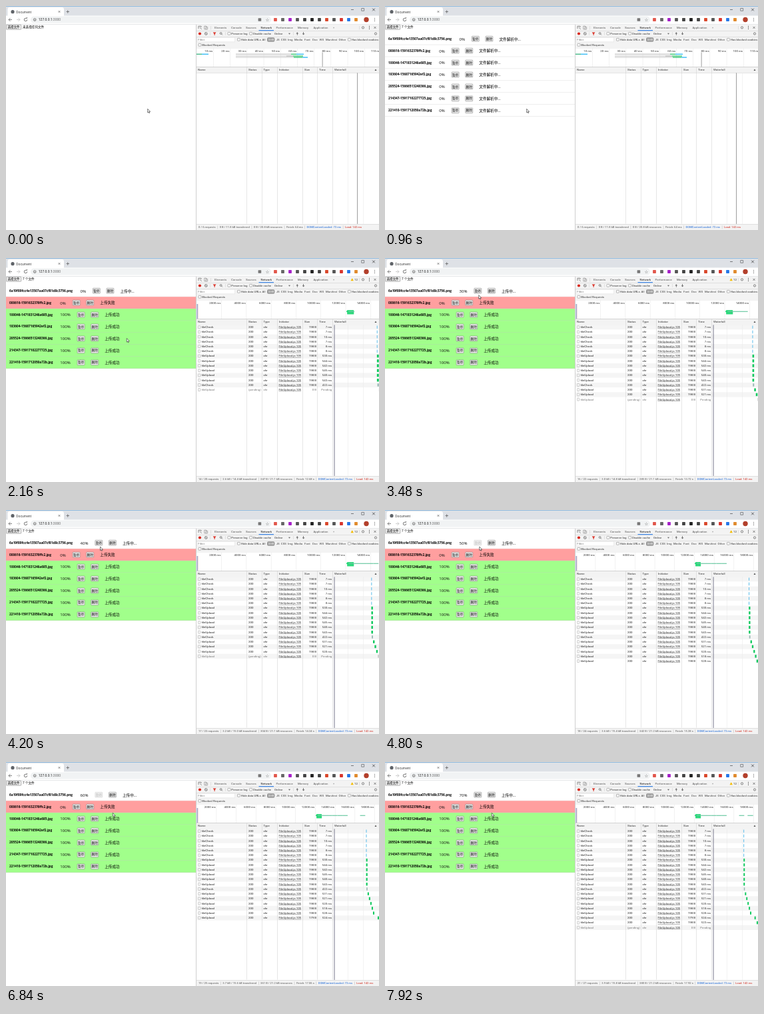
Animation of 560 by 336 pixels, one loop 8 s. Source, as an HTML page with a canvas:

```html
<!DOCTYPE html>
<html lang="zh">
<head>
<meta charset="utf-8">
<title>Document</title>
<style>
  html, body { margin: 0; width: 100%; height: 100%; overflow: hidden; background: #fff; }
  canvas { display: block; width: 560px; height: 336px; }
</style>
</head>
<body>
<canvas id="stage"></canvas>
<script>
const W = 560, H = 336, LOOP = 8000, STEP = 120;
const PANEL = 286, FALL = 493, ROW = 7.23, BODY = 100.1;
const UI = 'Roboto, "Noto Sans CJK SC", sans-serif';
const PAGE = '"Open Sans", "Noto Sans CJK SC", sans-serif';

const canvas = document.getElementById('stage');
const ratio = window.devicePixelRatio || 1;
canvas.width = W * ratio;
canvas.height = H * ratio;
const c = canvas.getContext('2d');

// Requests: start in seconds, duration in milliseconds
const request = (name, start, ms, size = 198) => ({ name, start, ms, size, end: start + ms / 1000 });
const chunks = [
  [12.685, 531], [13.2, 521], [13.72, 520], [14.24, 518],
  [14.755, 528], [16.536, 524, 179], [17.397, 523], [17.93, 520]
].map(args => request('fileUpload', ...args));
const requests = [
  ...[7, 7, 10, 7, 8, 8].map(ms => request('fileCheck', 12.1, ms)),
  ...[530, 544, 542, 545, 540, 543].map(ms => request('fileUpload', 12.125, ms)),
  request('fileCheck', 12.258, 422),
  ...chunks
];

const files = [
  '6a19f89fcc4e13507aa07cf81d8c3756.png', '000616-1591632376ffc2.jpg',
  '100046-1471831246a685.jpg', '183604-15687165942ef2.jpg',
  '205524-15666513248366.jpg', '214347-15917102277725.jpg', '221410-1591712050a72b.jpg'
];

// [animation ms, network seconds] and [animation ms, x, y]
const clockKeys = [[1560, 12.12], [2160, 12.72], [3480, 13.87], [4800, 15.3], [6840, 17.1], [8000, 18.02]];
const pointerKeys = [[0, 212.7, 154.3], [1560, 212.7, 154.3], [2160, 181.3, 120.5], [3000, 140.3, 56],
  [4320, 141.6, 55], [4800, 141.8, 55], [5400, 160.3, 76.4], [8000, 160.3, 76.4]];

function along(keys, t) {
  let i = 1;
  while (i < keys.length - 1 && keys[i][0] < t) i++;
  const a = keys[i - 1], b = keys[i];
  const k = Math.min(1, Math.max(0, (t - a[0]) / (b[0] - a[0])));
  return a.slice(1).map((v, j) => v + (b[j + 1] - v) * k);
}

function rect(x, y, w, h, color) {
  c.fillStyle = color;
  c.fillRect(x, y, w, h);
}

function frame(x, y, w, h, color, fill, radius = 0) {
  c.beginPath();
  c.roundRect(x, y, w, h, radius);
  if (fill) { c.fillStyle = fill; c.fill(); }
  if (color) { c.strokeStyle = color; c.lineWidth = 0.5; c.stroke(); }
}

function dot(x, y, r, color) {
  c.beginPath();
  c.arc(x, y, r, 0, 7);
  c.fillStyle = color;
  c.fill();
}

function path(points, color, width = 0.7, fill) {
  c.beginPath();
  points.forEach(([x, y], i) => i ? c.lineTo(x, y) : c.moveTo(x, y));
  if (fill) { c.closePath(); c.fillStyle = fill; c.fill(); }
  if (color) { c.strokeStyle = color; c.lineWidth = width; c.stroke(); }
}

function ring(x, y, r, color, from = 0, to = 7) {
  c.beginPath();
  c.arc(x, y, r, from, to);
  c.strokeStyle = color;
  c.lineWidth = 0.8;
  c.stroke();
}

function cross(x, y, r, color) {
  path([[x - r, y - r], [x + r, y + r]], color);
  path([[x - r, y + r], [x + r, y - r]], color);
}

// Draws text on its baseline and returns its width
function text(s, x, y, { size = 4.4, color = '#333', font = UI, weight = 400, align = 'left' } = {}) {
  c.font = `${weight} ${size}px ${font}`;
  c.textAlign = align;
  c.fillStyle = color;
  c.fillText(s, x, y);
  return c.measureText(s).width;
}

function check(x, y, label) {
  frame(x, y - 3.8, 3.8, 3.8, '#777', '#fff', 0.5);
  text(label, x + 5.2, y);
}

function menuDots(x, y) {
  for (const dy of [-2, 0, 2]) dot(x, y + dy, 0.55, '#555');
}

function drawBrowser() {
  rect(0, 0, W, 15, '#dee1e6');
  rect(0, 0, W, 0.8, '#7fb2de');
  frame(2.5, 2, 84.5, 15, null, '#fff', 3);
  dot(10, 8.7, 2.6, '#5f6368');
  text('Document', 15.3, 11, { size: 5, color: '#444' });
  cross(80, 8.5, 1.3, '#555');
  path([[90.5, 8.5], [95, 8.5]], '#555');
  path([[92.7, 6.3], [92.7, 10.8]], '#555');
  path([[518, 5.5], [522, 5.5]], '#333', 0.6);
  frame(533.8, 3.5, 3.8, 3.8, '#333');
  cross(552, 5.5, 1.9, '#333');

  rect(0, 14.5, W, 13, '#fff');
  path([[6.5, 18], [4, 20.5], [6.5, 23]], '#555');
  path([[4, 20.5], [9, 20.5]], '#555');
  path([[18.5, 18], [21, 20.5], [18.5, 23]], '#bbb');
  path([[16, 20.5], [21, 20.5]], '#bbb');
  ring(29.5, 20.5, 2.2, '#555', 0, 5.2);
  path([[29.8, 18.5], [31.8, 18.8], [31.8, 16.8]], null, 0, '#555');
  frame(37, 15.6, 361, 10, null, '#f1f3f4', 5);
  ring(43.2, 20.5, 1.9, '#666');
  rect(42.8, 20, 0.8, 1.6, '#666');
  const w = text('127.0.0.1', 48.8, 22.3, { size: 5, color: '#222' });
  text(':3000', 48.8 + w, 22.3, { size: 5, color: '#666' });

  frame(378.6, 18.2, 4.6, 4.6, null, '#777', 0.5);
  text('☆', 392.5, 22.7, { size: 6.5, color: '#555', align: 'center', font: '"DejaVu Sans", sans-serif' });
  ['#e2574c', '#666', '#a520c8', '#555', '#444', '#222', '#444', '#d9472b', '#555', '#d8342c', '#2677e8', '#e08a2c']
    .forEach((color, i) => frame(402.1 + i * 11, 18.1, 4.8, 4.8, null, color, 0.6));
  dot(541, 20.5, 3.7, '#b3402c');
  menuDots(553.5, 20.5);
  rect(0, 27.2, W, 0.6, '#d5d7da');
}

function pageButton(x, y, label, disabled) {
  frame(x, y, 11, 7.8, disabled ? '#ccc' : '#777', '#efefef', 0.8);
  text(label, x + 5.5, y + 5.5, { size: 4.6, color: disabled ? '#bbb' : '#000', align: 'center', font: PAGE });
}

function drawPage(t, now) {
  const chosen = t >= 960;
  frame(0.4, 28.2, 22.4, 7, '#767676', '#efefef', 0.8);
  text('选择文件', 11.4, 33.3, { size: 4.5, color: '#000', font: PAGE, align: 'center' });
  text(chosen ? '7 个文件' : '未选择任何文件', 25, 33.3, { size: 4.6, color: '#000', font: PAGE });
  if (!chosen) return;

  const uploaded = now >= 12.67;
  const progress = 10 * chunks.filter(k => k.start + 0.08 < now).length;
  files.forEach((name, i) => {
    const top = 40.3 + i * 17.93, base = top + 10.8;
    const finished = i > 0 && uploaded, failed = finished && i === 1;
    if (finished) rect(0, top, 285, 18, failed ? '#ff9f9f' : '#a1ff8b');
    rect(0, top + 17.5, 285, 0.5, finished ? 'rgba(190,190,190,.6)' : '#ddd');

    const percent = i === 0 ? progress : finished && !failed ? 100 : 0;
    let status = '文件解析中...';
    if (finished) status = failed ? '上传失败' : '上传成功';
    else if (now >= (i ? 12.1 : 12.258)) status = '上传中...';

    text(name, 5, base - 0.4, { size: 4.8, color: '#000', font: PAGE, weight: 700 });
    const x = i ? 81.3 : 111.5;
    const left = x + 10.3 + text(percent + '%', x, base + 0.5, { size: 6.1, color: '#111', font: PAGE });
    const paused = i === 0 && t >= 4320 && t < 7260;
    pageButton(left, top + 5, '暂停', paused);
    pageButton(left + 20.6, top + 5, '删除');
    text(status, left + 41.2, base + 0.4, { size: 5.6, color: '#000', font: PAGE });
  });
}

function drawToolbars(active) {
  rect(285, 27.8, 0.8, H, '#c4c4c4');
  rect(PANEL, 27.8, W - PANEL, 35.5, '#f3f3f3');
  for (const y of [37, 46, 63]) rect(PANEL, y, W - PANEL, 0.5, '#ccc');

  path([[289, 34], [289, 30.3], [293, 30.3], [293, 32]], '#666');
  path([[290.8, 32], [293.8, 34.8]], '#666');
  frame(297.8, 30.2, 3, 4.6, '#666');
  frame(300.2, 31.5, 2.4, 3.4, '#666', '#f3f3f3');
  rect(307, 30, 0.5, 5.5, '#ccc');
  [['Elements', 313], ['Console', 338], ['Sources', 360], ['Network', 382.5],
   ['Performance', 405.5], ['Memory', 438], ['Application', 461.5], ['»', 491]]
    .forEach(([label, x]) => text(label, x, 34, { color: label === 'Network' ? '#111' : '#555' }));
  rect(379.5, 36.2, 22.5, 1, '#1a73e8');
  if (active) {
    path([[517.5, 34.2], [519.7, 30.2], [521.9, 34.2]], null, 0, '#f4bd00');
    text('12', 523, 34);
  }
  rect(530, 30, 0.5, 5.5, '#ccc');
  ring(536, 32.4, 1.6, '#666');
  menuDots(545.5, 32.4);
  cross(554, 32.4, 1.5, '#555');

  dot(291, 41.5, 2.1, '#d9281c');
  ring(300.3, 41.5, 1.9, '#666');
  path([[299, 40.2], [301.6, 42.8]], '#666');
  rect(306.5, 39, 0.5, 5, '#ccc');
  path([[310.7, 39.6], [315.5, 39.6], [313.6, 42], [313.6, 44], [312.6, 44], [312.6, 42]], null, 0, '#d9281c');
  ring(322.6, 41, 1.4, '#666');
  path([[323.6, 42], [325, 43.5]], '#666');
  rect(329.5, 39, 0.5, 5, '#ccc');
  check(333, 43.2, 'Preserve log');
  check(365.7, 43.2, 'Disable cache');
  text('Online', 403, 43.2);
  path([[424, 40.7], [427, 40.7], [425.5, 42.8]], null, 0, '#666');
  rect(431.5, 39, 0.5, 5, '#ccc');
  path([[435.5, 41.5], [437.3, 39.3], [439.1, 41.5]], null, 0, '#666');
  path([[444.8, 41.3], [446.6, 43.5], [448.4, 41.3]], null, 0, '#666');
  rect(436.9, 41, 0.8, 2.8, '#666');
  rect(446.2, 39, 0.8, 2.8, '#666');
  ring(555, 41.5, 1.6, '#666');

  frame(287, 47.2, 56.5, 6.6, '#ddd', '#fff');
  text('Filter', 288.3, 52.2, { color: '#777' });
  check(347.5, 52.2, 'Hide data URLs');
  frame(392, 47.2, 11.4, 6.6, null, '#9a9a9a', 2);
  [['All', 384.5], ['XHR', 393.7], ['JS', 405.7], ['CSS', 412.8], ['Img', 423], ['Media', 433],
   ['Font', 448], ['Doc', 460], ['WS', 470.5], ['Manifest', 480], ['Other', 499.5]]
    .forEach(([label, x]) => text(label, x, 52.2, { color: label === 'XHR' ? '#fff' : '#444' }));
  check(513.5, 52.2, 'Has blocked cookies');
  check(289, 60.2, 'Blocked Requests');
}

function drawOverview(started, now) {
  rect(PANEL, 63.5, W - PANEL, 28, '#fff');
  const gap = now > 14.7 ? 29.7 : now ? 37.3 : 25.2;
  const unit = now ? 2000 : 10;
  for (let i = 1; i < 12; i++) {
    const x = PANEL + i * gap;
    rect(x, 63.5, 0.5, 28, '#e4e4e4');
    text(`${i * unit} ms`, x - 0.9, 69.1, { align: 'right' });
  }
  if (!now) {
    [[286, 294, 71.6, '#36b37e'], [294, 304, 71.6, '#29b6f6'],
     [345, 428, 71.6, '#c8c8c8'], [428, 436, 71.6, '#2fc46b'], [436, 447, 71.6, '#29b6f6'],
     [345, 421, 74.4, '#d0d0d0'], [421, 431, 74.4, '#aaa'], [431, 446, 74.4, '#2fc46b'],
     [345, 432, 76.4, '#d8d8d8'], [432, 445, 76.4, '#2fc46b'], [445, 453, 76.4, '#29b6f6']]
      .forEach(([a, b, y, color]) => rect(a, y, b - a, 1.3, color));
    rect(474.7, 69.5, 0.8, 22, '#888');
    return;
  }
  const at = s => PANEL + s * gap / 2;
  started.forEach((r, i) => {
    const y = i >= 6 && i < 12 ? 78.2 + (i - 6) : 79.7;
    rect(at(r.start), y, Math.max(0.6, at(Math.min(r.end, now)) - at(r.start)), 1.2, i < 12 ? '#12d46a' : '#6cc9a4');
  });
  rect(286.7, 69, 0.9, 22.3, '#4a6fb0');
  rect(287.8, 69, 0.5, 22.3, '#e0a0a0');
}

function drawTable(started, now) {
  rect(PANEL, 91.2, W - PANEL, 9, '#f3f3f3');
  rect(PANEL, 91.2, W - PANEL, 0.6, '#bbb');
  rect(PANEL, 100, W - PANEL, 0.5, '#ccc');
  started.forEach((r, i) => { if (i % 2 === 0) rect(PANEL, BODY + i * ROW, W - PANEL, ROW, '#f5f5f5'); });
  [['Name', 288], ['Status', 364], ['Type', 386.5], ['Initiator', 410], ['Size', 448], ['Time', 470], ['Waterfall', 493]]
    .forEach(([label, x]) => text(label, x, 97.2));
  for (const x of [361, 384, 407, 445, 467, 490]) rect(x, 91.5, 0.5, 235, '#ccc');
  for (const x of [513, 536]) rect(x, 100.4, 0.5, 226.5, '#e6e6e6');
  path([[553.5, 97], [555, 94.4], [556.5, 97]], null, 0, '#555');

  if (!now) {
    rect(527, 100.4, 0.8, 226.5, '#888');
    return;
  }
  rect(492.6, 100.4, 0.9, 226.5, '#6a6a80');
  const span = Math.max(...started.map(r => Math.min(r.end, now)));
  const at = s => FALL + (W - FALL) * s / span;
  started.forEach((r, i) => {
    const top = BODY + i * ROW, y = top + 5;
    const pending = r.end > now, color = pending ? '#777' : '#222';
    frame(288.6, top + 1.6, 3, 3.9, '#999', '#fff', 0.4);
    text(r.name, 293.5, y, { color });
    text(pending ? '(pending)' : '200', 364, y, { color });
    text('xhr', 386.5, y, { color });
    const w = text('FileUpload.js:105', 409.5, y, { color: '#333' });
    rect(409.5, y + 0.6, w, 0.4, '#555');
    text(pending ? '0 B' : r.size + ' B', 466, y, { color, align: 'right' });
    text(pending ? 'Pending' : r.ms + ' ms', 489.3, y, { color: pending ? '#777' : '#333', align: 'right' });

    const x = at(r.start), width = at(Math.min(r.end, now)) - x;
    const slow = r.ms > 100, upload = r.name === 'fileUpload';
    const fill = pending ? '#ccc' : upload ? '#10c95e' : slow ? '#9bb8b5' : '#5cbdea';
    rect(x, top + 1.4, Math.max(1, width), 4.4, fill);
  });
}

function drawFooter(started, now) {
  rect(PANEL, 327, W - PANEL, 9, '#f3f3f3');
  rect(PANEL, 327, W - PANEL, 0.5, '#ccc');
  const done = started.filter(r => r.end <= now);
  const moved = done.reduce((sum, r) => sum + r.size, 0) / 1000;
  const body = done.length * 19;
  const finish = done.length ? Math.max(...done.map(r => r.end)).toFixed(2) + ' s' : '64 ms';
  let x = 289;
  [[`${started.length} / ${started.length + 6} requests`],
   [`${moved ? moved.toFixed(1) + ' kB' : '0 B'} / ${(11.84 + moved).toFixed(1)} kB transferred`],
   [`${body} B / ${(20.82 + body / 1000).toFixed(1)} kB resources`],
   [`Finish: ${finish}`],
   ['DOMContentLoaded: 73 ms', '#1a66d6'],
   ['Load: 142 ms', '#d0281c']
  ].forEach(([label, color = '#555'], i) => {
    if (i) rect(x - 3.1, 329.3, 0.5, 5, '#bbb');
    x += text(label, x, 333, { size: 4.2, color }) + 5.9;
  });
}

function drawPointer(x, y) {
  path([[0, 0], [0, 5.6], [1.3, 4.5], [2.1, 6.4], [3, 6], [2.2, 4.2], [3.9, 4.1], [0, 0]]
    .map(([dx, dy]) => [x + dx, y + dy]), '#222', 0.6, '#fff');
}

function draw(t) {
  const now = t < 1560 ? 0 : along(clockKeys, t)[0];
  const started = requests.filter(r => r.start <= now);
  c.setTransform(ratio, 0, 0, ratio, 0, 0);
  rect(0, 0, W, H, '#fff');
  drawBrowser();
  drawPage(t, now);
  drawToolbars(now > 0);
  drawOverview(started, now);
  drawTable(started, now);
  drawFooter(started, now);
  drawPointer(...along(pointerKeys, t));
}

function tick() {
  const t = performance.now() % LOOP;
  draw(Math.floor(t / STEP) * STEP);
  requestAnimationFrame(tick);
}
tick();
</script>
</body>
</html>
```
